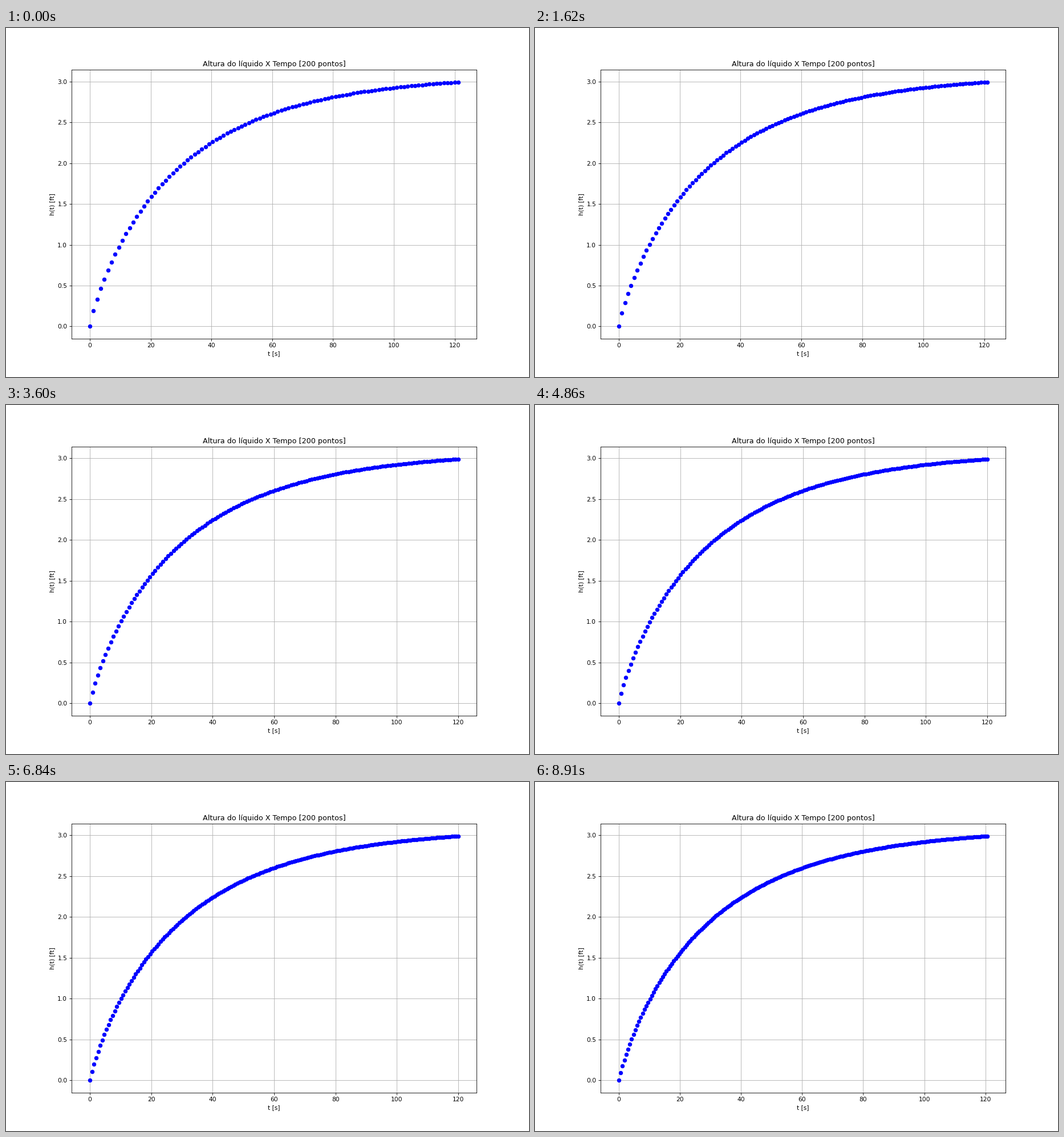
A matplotlib script for the animation above (9 s loop, 917x611 px).

```python
import math

import matplotlib.pyplot as plt
from matplotlib.animation import FuncAnimation

WIDTH, HEIGHT, DPI = 917, 611, 76.4
FRAMES, INTERVAL = 100, 90
FIRST_COUNT = 101
T_END = 120

INFLOW = 0.1605   # level rise from the feed, ft/s
OUTFLOW = 0.09136  # drain coefficient, ft^0.5/s


def simulate(steps):
    """Euler integration of h' = INFLOW - OUTFLOW * sqrt(h)."""
    dt = T_END / steps
    times, levels = [0.0], [0.0]
    # Summing dt lets rounding decide whether one extra step is taken.
    while times[-1] < T_END:
        h = levels[-1]
        levels.append(h + dt * (INFLOW - OUTFLOW * math.sqrt(h)))
        times.append(times[-1] + dt)
    return times, levels


plt.rcParams["font.family"] = "DejaVu Sans"
# The small addend keeps the pixel size from being truncated.
fig, ax = plt.subplots(
    figsize=((WIDTH + 1e-6) / DPI, (HEIGHT + 1e-6) / DPI), dpi=DPI)
ax.set_title("Altura do líquido X Tempo [200 pontos]")
ax.set_xlabel("t [s]")
ax.set_ylabel("h(t) [ft]")
ax.grid(True)
dots, = ax.plot([], [], "bo")


def update(frame):
    dots.set_data(*simulate(FIRST_COUNT + frame))
    ax.relim()
    ax.autoscale_view()
    return dots,


anim = FuncAnimation(fig, update, frames=FRAMES, interval=INTERVAL,
                     init_func=lambda: update(0), repeat=True,
                     repeat_delay=0, blit=False)
plt.show()
```
